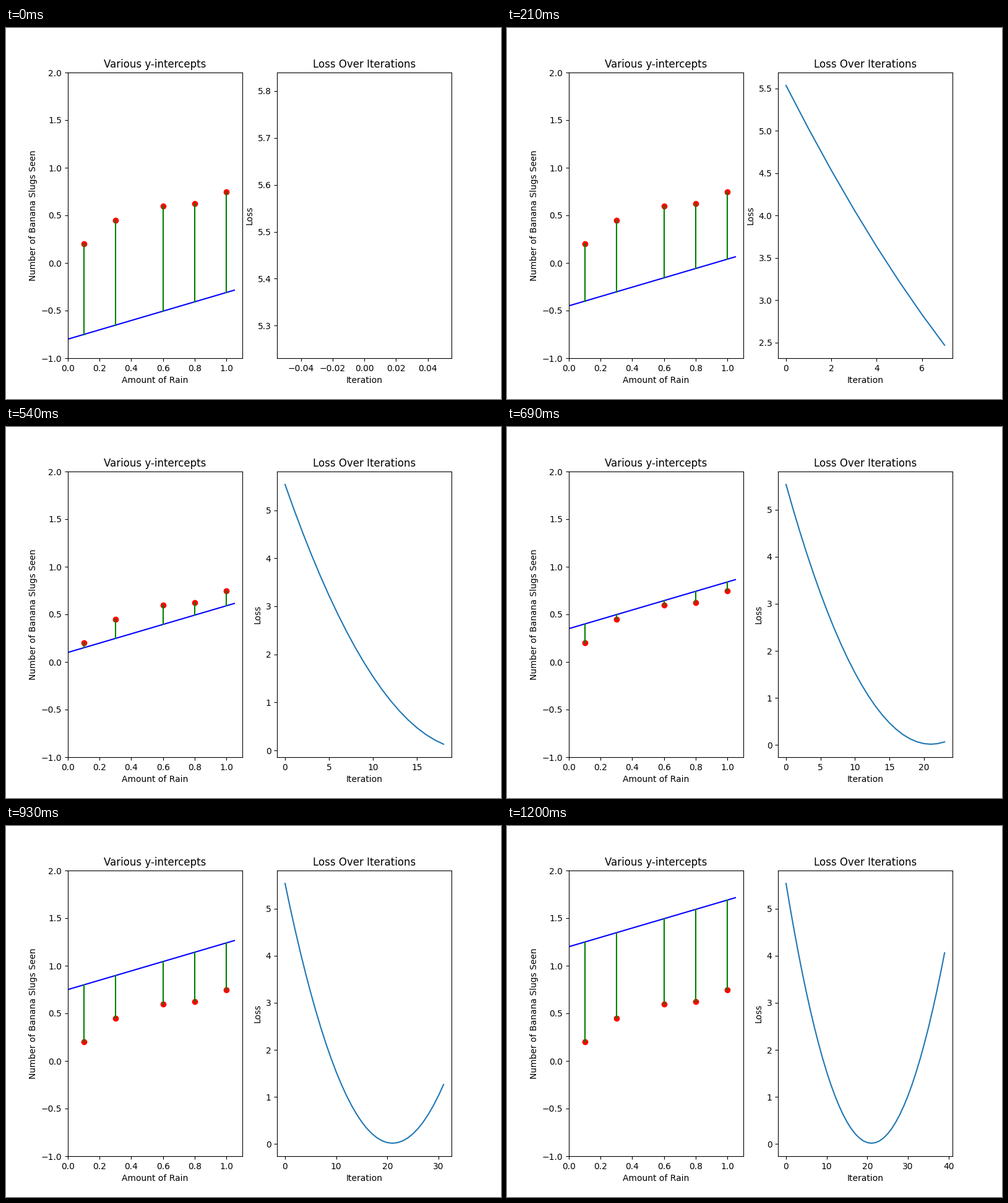
A matplotlib script for the animation above (1230 ms loop, 800 px wide and 600 px high).

```python
import numpy as np
import matplotlib.pyplot as plt
from matplotlib.animation import FuncAnimation

FRAMES = 41
INTERVAL = 30
SLOPE = 0.49

rain = np.array([0.1, 0.3, 0.6, 0.8, 1.0])
slugs = np.array([0.2, 0.45, 0.6, 0.625, 0.75])
line_x = np.array([0, 1.05])


def predict(x, i):
    return SLOPE * x - 0.8 + 0.05 * i


# The loss history stops one step before the fitted line does.
losses = [np.sum((slugs - predict(rain, i)) ** 2) for i in range(FRAMES - 1)]

fig, (fit_ax, loss_ax) = plt.subplots(1, 2, figsize=(8, 6), dpi=100)


def draw_fit(i):
    fit_ax.clear()
    fit_ax.plot(rain, slugs, "o", color="red")
    fit_ax.plot(line_x, predict(line_x, i), color="blue")
    for x, y in zip(rain, slugs):
        fit_ax.plot([x, x], [y, predict(x, i)], color="green")
    fit_ax.set(xlim=(0, 1.1), ylim=(-1, 2), title="Various y-intercepts",
               xlabel="Amount of Rain", ylabel="Number of Banana Slugs Seen")


def draw_loss(i):
    loss_ax.clear()
    loss_ax.plot(losses[:i + 1])
    loss_ax.set(title="Loss Over Iterations", xlabel="Iteration", ylabel="Loss")


def update(i):
    draw_fit(i)
    draw_loss(i)


anim = FuncAnimation(fig, update, frames=FRAMES, interval=INTERVAL,
                     repeat=True, repeat_delay=0)
plt.show()
```
